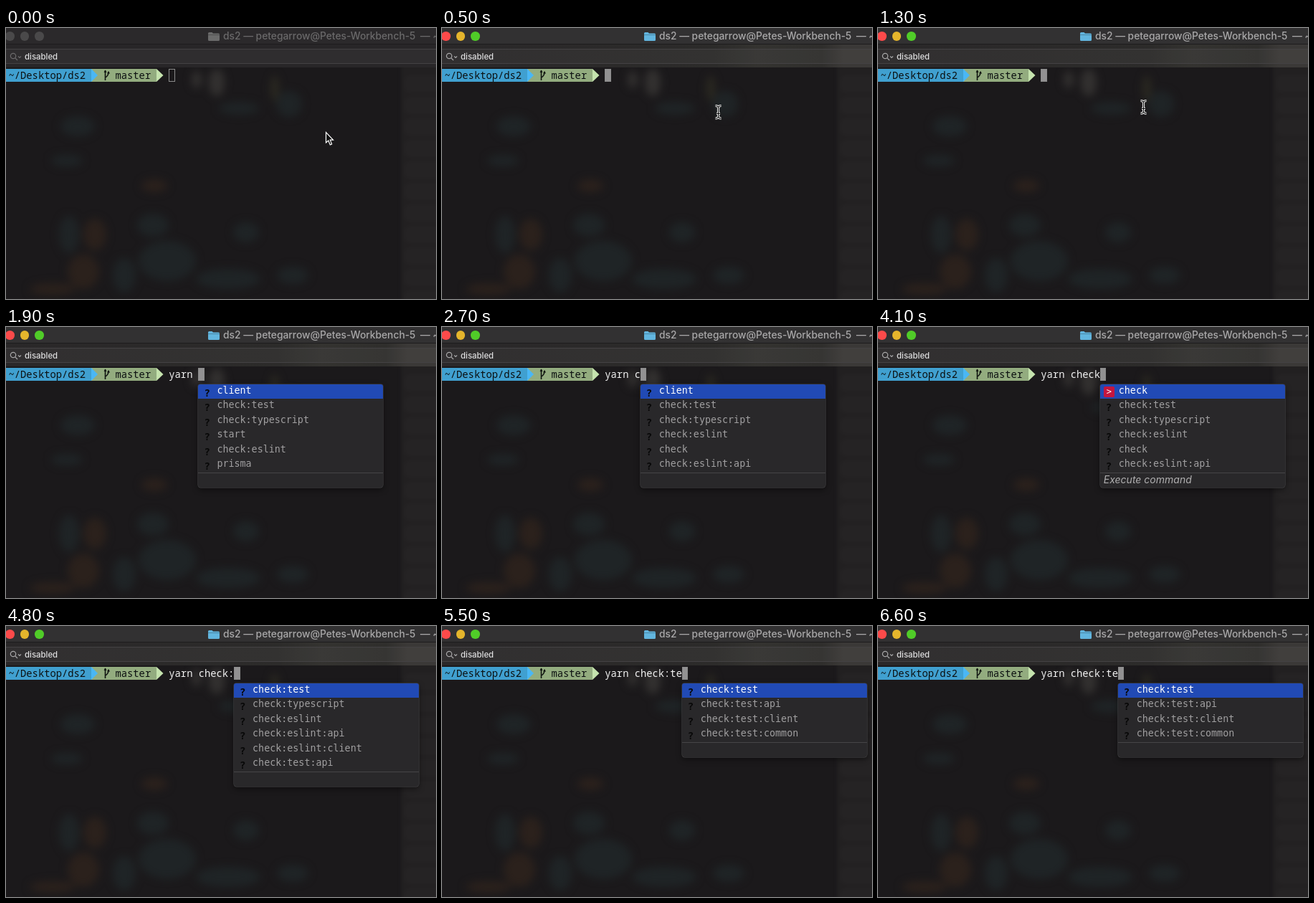
Animation of 600 by 378 pixels, one loop 6900 ms. Source, as an HTML page:

```html
<!DOCTYPE html>
<html lang="en">
<head>
<meta charset="utf-8">
<title>Terminal autocomplete</title>
<style>
html, body { margin: 0; width: 100%; height: 100%; overflow: hidden; background: #1b191b; }
#stage { position: relative; width: 600px; height: 378px; overflow: hidden; }
#stage > * { position: absolute; }
svg { display: block; }
span, i { position: absolute; white-space: pre; }
.bar { left: 0; top: 0; width: 600px; height: 22px; background: #2b292b; border-bottom: 1px solid #1d1c1d; }
.title { top: 0; font: 500 13.8px/22px Inter, sans-serif; color: #6a696a; }
.dot { top: 5px; width: 12.5px; height: 12.5px; border-radius: 50%; background: #4a494a; }
.folder { position: absolute; left: 282px; top: 5px; color: #6b6b6b; }
.find { left: 0; top: 23px; width: 600px; height: 32px; background: #282628; }
.find::before { content: ""; position: absolute; left: 0; right: 0; top: 6px; height: 19px;
  background: #ffffff08; border: solid #444244; border-width: 1px 0; }
.find span { left: 26px; top: 9px; font: 500 11.4px/16px Inter, sans-serif; color: #dededf; }
.find svg { position: absolute; left: 5px; top: 11px; opacity: .5; }
.term { font: 13.8px/18px "Noto Sans Mono", monospace; top: 56.5px; }
.prompt { left: 0; color: #0b0f10; }
.typed { left: 227.3px; color: #f2f2f2; }
.caret { top: 57px; width: 8.5px; height: 17.5px; box-sizing: border-box; border: 1px solid #8b8b8b; }
.active .bar { background: #323132; }
.active .title { color: #a9a8a9; }
.active .folder { color: #62b5de; }
.active .dot { background: var(--c); }
.active .find { background: linear-gradient(90deg, #2a2829 0, #2c2b2a 380px, #343330 440px, #2f2e2c 530px, #3b3937 560px); }
.active .find svg { opacity: 1; }
.active .caret { background: #929192; }
.menu { top: 79.5px; width: 258px; background: #29282a; border-radius: 3px 3px 4px 4px;
  box-shadow: 0 0 0 .5px #49484a, 0 3px 9px #0007; overflow: hidden; }
.row { position: relative; height: 20.6px; color: #a09fa0; }
.row span { left: 26px; top: 0; font: 13.35px/18px "DejaVu Sans Mono", monospace; }
.row i { left: 8px; top: 4px; font: bold 14px/17px "DejaVu Sans Mono", monospace; color: #080808; }
.row:first-child { background: #214ab5; color: #fff; }
.row i.run { left: 5px; top: 3px; width: 15px; height: 15px; border-radius: 2px; background: #c4163f;
  color: #fff; font: 12px/14px "DejaVu Sans Mono", monospace; text-align: center; }
.foot { height: 20px; border-top: 1px solid #464547; padding-left: 5px;
  font: italic 14px/18px Inter, sans-serif; color: #b0afb0; }
</style>
</head>
<body>
<div id="stage">
  <svg width="600" height="378" color-interpolation-filters="sRGB">
    <defs>
      <filter id="soft" x="-50%" y="-50%" width="200%" height="200%"><feGaussianBlur stdDeviation="6"/></filter>
      <filter id="haze" x="-50%" y="-50%" width="200%" height="200%"><feGaussianBlur stdDeviation="2"/></filter>
    </defs>
    <rect width="600" height="378" fill="#1b191b"/>
    <g id="blobs" filter="url(#soft)"></g>
    <g id="strip" filter="url(#haze)"></g>
  </svg>

  <div class="bar">
    <span class="dot" style="left:-1px;--c:#fc4a4a"></span>
    <span class="dot" style="left:19.5px;--c:#e5b52c"></span>
    <span class="dot" style="left:40px;--c:#50cc28"></span>
    <svg class="folder" width="17" height="14" fill="currentColor">
      <path d="M0 2.5Q0 1 1.5 1H5.5L7 2.5H14.5Q16 2.5 16 4V11.5Q16 13 14.5 13H1.5Q0 13 0 11.5Z"/>
      <path d="M0 4.6H16" stroke="#0004"/>
    </svg>
    <span class="title" style="left:303px">ds2 — petegarrow@Petes-Workbench-5</span>
    <span class="title" style="left:578px">— ~</span>
  </div>

  <div class="find">
    <svg width="18" height="13" fill="none" stroke="#a9a8a9" stroke-width="1.2">
      <circle cx="5" cy="5" r="3.7"/><path d="M7.8 7.8L11 11M12 5.5L14 7.5L16 5.5"/>
    </svg>
    <span>disabled</span>
  </div>

  <svg style="left:0;top:57px" width="222" height="18">
    <path d="M119 0H210V18H119Z" fill="#93ac7f"/>
    <path d="M0 0H119V18H0Z" fill="#40a0d0"/>
    <path d="M119 0L128 9L119 18Z" fill="#4ab7f5"/>
    <path d="M210 0L219.5 9L210 18Z" fill="#c5e3ae"/>
    <path d="M138.5 2V16M138.5 12Q143 10 143 4" fill="none" stroke="#101410" stroke-width="1.6"/>
    <path d="M136.5 5L138.5 1.5L140.5 5ZM141 6.5L143 3L145 6.5Z" fill="#101410"/>
  </svg>
  <div class="prompt term"><span style="left:3.5px">~/Desktop/ds2</span><span style="left:152.5px">master</span></div>

  <span class="typed term" id="typed"></span>
  <div class="caret" id="caret"></div>
  <div class="menu" id="menu"></div>

  <svg id="mouse" style="left:0;top:0" width="26" height="26" overflow="visible">
    <path id="arrow" d="M0 0V14.5L3.3 11.6L5.8 17.4L8.1 16.4L5.8 10.7H10Z" fill="#111" stroke="#fff" stroke-width="1.2"/>
    <g id="beam" fill="none">
      <path id="ibeam" d="M-4 -8.8Q0 -8.8 0 -6Q0 -8.8 4 -8.8M0 -6V6M-4 8.8Q0 8.8 0 6Q0 8.8 4 8.8M-2.5 2H2.5" stroke="#fff" stroke-width="3.2"/>
      <path d="M-4 -8.8Q0 -8.8 0 -6Q0 -8.8 4 -8.8M0 -6V6M-4 8.8Q0 8.8 0 6Q0 8.8 4 8.8M-2.5 2H2.5" stroke="#111" stroke-width="1.2"/>
    </g>
  </svg>
</div>
<script>
const LOOP = 6900, STEP = 100, ACTIVE_AT = 400, CHAR = 8.28, LEFT = 227;
const $ = id => document.getElementById(id);

// Blurred wallpaper behind the translucent window: colour, then [x, y, rx, ry]
const blobs = {
  '#333130': [[294, 76, 11, 19], [266, 72, 7, 12]],
  '#2b2921': [[375, 84, 6, 18]],
  '#1f2426': [[325, 112, 28, 9], [395, 106, 18, 18], [100, 137, 24, 14], [85, 185, 22, 8], [88, 288, 14, 26],
    [205, 275, 22, 16], [225, 325, 40, 28], [335, 285, 18, 14], [310, 350, 45, 14], [165, 345, 16, 24], [400, 345, 22, 12]],
  '#2b211c': [[207, 220, 18, 9], [124, 288, 16, 22], [108, 340, 22, 24], [65, 364, 32, 8]]
};
const shapes = [];
for (const color in blobs)
  for (const [x, y, rx, ry] of blobs[color])
    shapes.push(`<ellipse cx="${x}" cy="${y}" rx="${rx}" ry="${ry}" fill="${color}"/>`);
$('blobs').innerHTML = shapes.join('');

let strip = '<rect x="551" y="50" width="60" height="340" fill="#222021"/>';
for (let y = 66; y < 378; y += 30)
  strip += `<rect x="556" y="${y}" width="60" height="24" rx="8" fill="#252324"/>`;
$('strip').innerHTML = strip;

const list = names => names.split(' ').map(n => 'check:' + n);
const che = ['check:test', 'check:typescript', 'check:eslint', 'check', 'check:eslint:api', 'check:eslint:client'];
const menus = {
  'yarn ': ['client', 'check:test', 'check:typescript', 'start', 'check:eslint', 'prisma'],
  'yarn c': ['client', ...che.slice(0, 5)],
  'yarn ch': che,
  'yarn che': che,
  'yarn chec': che,
  'yarn check': ['check', ...che.slice(0, 5)],
  'yarn check:': list('test typescript eslint eslint:api eslint:client test:api'),
  'yarn check:t': list('test typescript test:api test:client test:common'),
  'yarn check:te': list('test test:api test:client test:common')
};
const line = 'yarn check:te';
const keyTimes = [1500, 1600, 1700, 1800, 1900, 2700, 2800, 2900, 3400, 3600, 4800, 4900, 5000];

function menuHtml(text) {
  const exact = text === 'yarn check';
  const rows = menus[text].map((name, i) => {
    const icon = exact && i === 0 ? '<i class="run">&gt;</i>' : '<i>?</i>';
    return `<div class="row">${icon}<span>${name}</span></div>`;
  });
  return rows.join('') + `<div class="foot">${exact ? 'Execute command' : ''}</div>`;
}

let shown = null;
function showText(text) {
  if (text === shown) return;
  shown = text;
  const x = LEFT + text.length * CHAR;
  $('typed').textContent = text;
  $('caret').style.left = x + 'px';
  const menu = $('menu');
  menu.hidden = !(text in menus);
  menu.style.left = x + 'px';
  menu.innerHTML = menu.hidden ? '' : menuHtml(text);
}

function draw() {
  const t = Math.floor(performance.now() % LOOP / STEP) * STEP;
  const active = t >= ACTIVE_AT;
  $('stage').className = active ? 'active' : '';
  showText(line.slice(0, keyTimes.filter(k => k <= t).length));

  const p = Math.min(t / 700, 1), e = p * p * (3 - 2 * p);
  $('mouse').style.transform = `translate(${446.5 - 76 * e}px, ${145.5 - 35.2 * e}px)`;
  $('mouse').style.display = t < keyTimes[0] ? '' : 'none';
  $('arrow').style.display = active ? 'none' : '';
  $('beam').style.display = active ? '' : 'none';
  requestAnimationFrame(draw);
}
draw();
</script>
</body>
</html>
```
